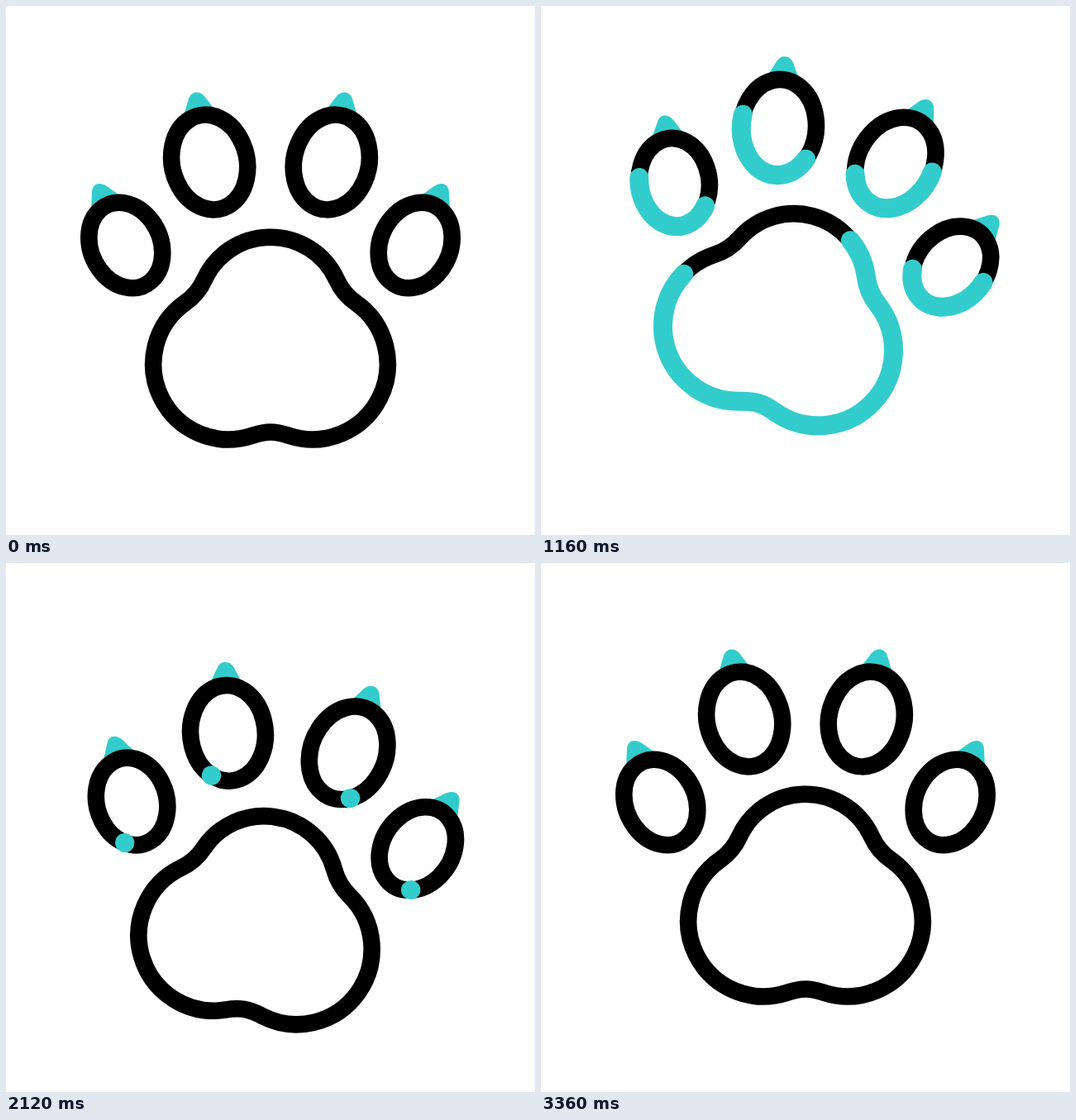
Recreate the animation shown at these times as an HTML page. Size 640x640 px, loop 3600 ms.

```html
<!DOCTYPE html>
<html lang="en">
<head>
<meta charset="utf-8">
<title>Paw</title>
<style>
  html, body { margin: 0; width: 100%; height: 100%; overflow: hidden; background: #fff; }
  svg { display: block; width: 100%; height: 100%; }
  path { fill: none; stroke: #000; stroke-width: 20.6; }
  .claw { fill: #33cccc; stroke: none; }
  .trace { stroke: #33cccc; stroke-width: 23; stroke-linecap: round; }
</style>
</head>
<body>
<svg viewBox="0 0 640 640"><g id="paw"></g></svg>
<script>
const LOOP = 3600;
const paw = document.getElementById('paw');
const traces = [];

// Each trace runs twice around its outline: the head leads, the tail follows.
const PAD_TIMING = { head: 0, tail: 324, repeat: 736, duration: 612 };
const TOE_TIMING = { head: 180, tail: 604, repeat: 738, duration: 800 };

const TILT = [[0, 0], [1040, 20.5], [1660, -18.5], [2170, 10], [2665, -5], [3360, 0]];
const SHIFT = [[0, 0], [640, 38], [1330, -37], [1955, 38], [2530, -19], [3200, 0]];

function add(parent, name, attrs) {
  const node = document.createElementNS('http://www.w3.org/2000/svg', name);
  for (const key in attrs) node.setAttribute(key, attrs[key]);
  return parent.appendChild(node);
}

function addOutline(parent, d, timing) {
  add(parent, 'path', { d });
  for (const pass of [0, 1]) {
    const node = add(parent, 'path', { d, class: 'trace', pathLength: 1 });
    traces.push({ node, timing, delay: pass * timing.repeat });
  }
}

function addToe(side, x, y, rx, ry, angle, claw) {
  const half = add(paw, 'g', { transform: side < 0 ? 'translate(640 0) scale(-1 1)' : '' });
  add(half, 'path', { d: claw, class: 'claw' });
  const toe = add(half, 'g', { transform: `translate(${x} ${y}) rotate(${angle})` });
  const start = 211 * Math.PI / 180;
  const sx = rx * Math.sin(start), sy = -ry * Math.cos(start);
  const arc = `A${rx} ${ry} 0 0 1 `;
  addOutline(toe, `M${sx} ${sy}${arc}${-sx} ${-sy}${arc}${sx} ${sy}Z`, TOE_TIMING);
}

for (const side of [1, -1]) {
  addToe(side, 144.8, 289.5, 42.3, 53.5, -25,
    'M103 246L104 226C104 215 113 212 122 218L139 230Z');
  addToe(side, 246.2, 189, 45.3, 57.9, -13,
    'M215 133L221 112C224 103 234 102 240 109L253 126Z');
}
addOutline(paw, `M317 279.8A87.6 87.6 0 0 1 400 331C405 342 413 352 423.2 359
  A91 91 0 0 1 342.9 520C335.5 517.5 328 515.5 320 515.5
  S304.5 517.5 297.1 520A91 91 0 0 1 216.8 359
  C227 352 235 342 240 331A87.6 87.6 0 0 1 317 279.8Z`, PAD_TIMING);

function ease(t, from, duration) {
  const u = Math.min(1, Math.max(0, (t - from) / duration));
  return (1 - Math.cos(Math.PI * u)) / 2;
}

function track(keys, t) {
  let value = keys[0][1];
  for (let i = 1; i < keys.length; i++) {
    const [t0, v0] = keys[i - 1], [t1, v1] = keys[i];
    value += (v1 - v0) * ease(t, t0, t1 - t0);
  }
  return value;
}

function draw(t) {
  paw.setAttribute('transform', `translate(0 ${track(SHIFT, t)}) rotate(${track(TILT, t)} 320 320)`);
  for (const { node, timing, delay } of traces) {
    const head = ease(t, timing.head + delay, timing.duration);
    const tail = ease(t, timing.tail + delay, timing.duration);
    const length = head - tail;
    node.style.display = length > 0.0005 ? '' : 'none';
    node.setAttribute('stroke-dasharray', `${length} 2`);
    node.setAttribute('stroke-dashoffset', -tail);
  }
}

const begin = performance.now();
function frame() {
  draw((performance.now() - begin) % LOOP);
  requestAnimationFrame(frame);
}
frame();
</script>
</body>
</html>
```
